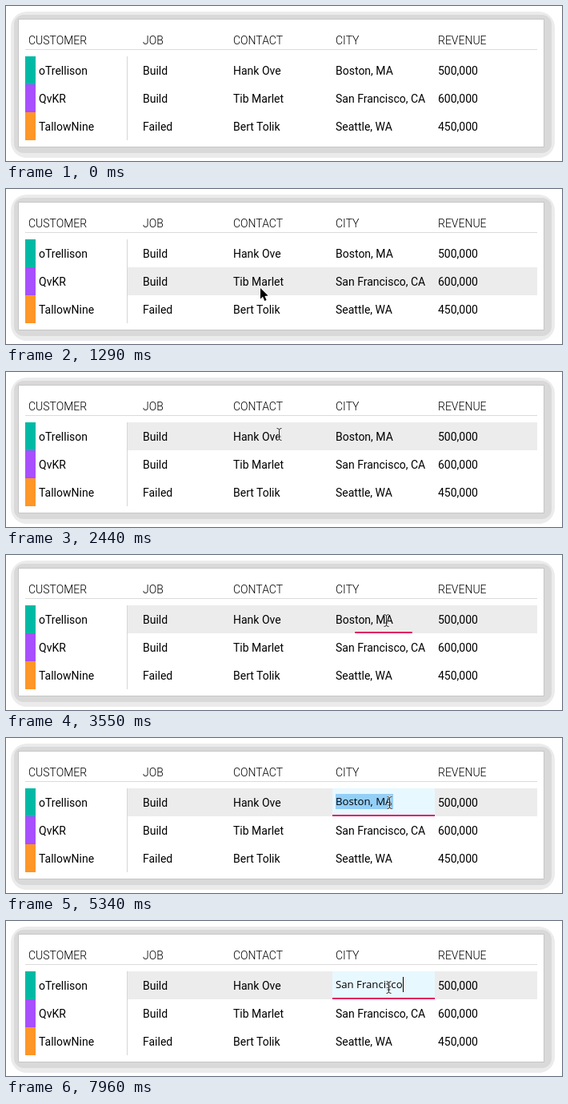
Recreate the animation shown at these times as an HTML page. Size 695 by 194 pixels, loop 8000 ms.

```html
<!DOCTYPE html>
<html lang="en">
<head>
<meta charset="utf-8">
<title>Inline table editing</title>
<style>
  html, body { margin: 0; width: 100%; height: 100%; overflow: hidden; background: #fff; }
  svg { display: block; width: 695px; height: 194px; }
  text { font: 14px Roboto, sans-serif; fill: #000; white-space: pre; }
  .head { font-weight: 300; }
  .input { font: 13.2px "Open Sans", "Noto Sans", sans-serif; }
</style>
</head>
<body>
<svg id="stage" viewBox="0 0 695 194"></svg>
<script>
const LOOP = 8000;
const stage = document.getElementById('stage');

function add(tag, attrs, parent = stage) {
  const el = document.createElementNS('http://www.w3.org/2000/svg', tag);
  for (const k in attrs) el.setAttribute(k, attrs[k]);
  return parent.appendChild(el);
}
const rect = (x, y, width, height, fill, parent, rx = 0) =>
  add('rect', { x, y, width, height, fill, rx }, parent);
function label(x, y, str, cls = '', parent = stage) {
  const el = add('text', { x, y, class: cls }, parent);
  el.textContent = str;
  return el;
}
const show = (el, on) => el.setAttribute('visibility', on ? 'visible' : 'hidden');

// Card with a banded shadow
rect(6, 7, 680, 183, '#ebebeb', stage, 20);
rect(10, 11, 672, 173, '#d9d9d9', stage, 12);
rect(15, 16, 658, 161, '#c6c6c6');
rect(16, 17, 656, 159, '#fff');
rect(24, 54, 640, 1, '#dadada');

const TOP = 63, ROW = 35;
const hover = rect(152, TOP, 512, ROW, '#ececec');
rect(151, TOP, 1, ROW * 3, '#d6d6d6');
['#00b9a5', '#a84fff', '#ff9628'].forEach((c, i) => rect(24, TOP + i * ROW, 13, ROW, c));

const columns = [171, 284, 412, 540];
['CUSTOMER', 'JOB', 'CONTACT', 'CITY', 'REVENUE'].forEach((s, i) =>
  label(i ? columns[i - 1] : 28, 48, s, 'head'));
const rows = [
  ['oTrellison', 'Build', 'Hank Ove', 'Boston, MA', '500,000'],
  ['QvKR', 'Build', 'Tib Marlet', 'San Francisco, CA', '600,000'],
  ['TallowNine', 'Failed', 'Bert Tolik', 'Seattle, WA', '450,000']
];
const cells = rows.map((row, r) => row.map((s, i) =>
  label(i ? columns[i - 1] : 41, 86 + r * ROW, s)));
const city = cells[0][3];

// Editor: opening state, then the focused field
const BLUE = '#94cff7';
const opening = add('g');
rect(482, 72, 48, 15, BLUE, opening);
rect(410, 87, 120, 8, BLUE, opening);
rect(533, TOP, 3, 32, BLUE, opening);
const field = add('g');
rect(408, TOP, 128, 33, '#e8f8ff', field);
const selection = rect(412, 70, 72, 19, BLUE);
const input = label(412, 84, '', 'input');
const caret = rect(412, 70, 1, 19, '#000');
const underline = rect(408, 96, 128, 2, '#e2125f');

// Pointers, both with the hot spot at 0,0
function pointer(d, attrs, halo) {
  const g = add('g');
  add('path', { d, fill: 'none', stroke: '#fff', 'stroke-width': halo, 'stroke-linejoin': 'round' }, g);
  add('path', { d, ...attrs }, g);
  return g;
}
const arrow = pointer('M0 0V13.5L3 10.8L5.3 16L7.6 15L5.4 10L9.6 9.6Z', { fill: '#000' }, 1.8);
const beam = pointer('M-3 -7.5Q0 -7.5 0 -5.5V5.5Q0 7.5 -3 7.5M3 -7.5Q0 -7.5 0 -5.5M0 5.5Q0 7.5 3 7.5M-2 3H2',
  { fill: 'none', stroke: '#222', 'stroke-width': 1 }, 2);

// time, x, y
const path = [
  [360, 312, 15], [1120, 315, 98], [1290, 318, 124], [1400, 320, 138],
  [1580, 320, 138], [1810, 325, 96], [2330, 327, 78], [2440, 341, 78],
  [2960, 474, 82], [3430, 474, 82], [3790, 478.5, 83], [4030, 478.5, 83],
  [4150, 485, 84], [4230, 485, 84], [4330, 478.5, 83], [4980, 478.5, 83],
  [5110, 475, 78], [5260, 481, 79], [5400, 478.5, 83]
];
function pointerAt(t) {
  const i = path.findIndex(p => p[0] > t);
  if (i === 0) return path[0].slice(1);
  if (i < 0) return path[path.length - 1].slice(1);
  const [t0, x0, y0] = path[i - 1], [t1, x1, y1] = path[i];
  const k = (t - t0) / (t1 - t0);
  return [x0 + (x1 - x0) * k, y0 + (y1 - y0) * k];
}
const overText = (x, y) =>
  [43, 81, 116, 151].some(c => Math.abs(y - c) < 7.5) &&
  (x >= 284 && x <= 344 || x >= 412 && x <= 484);

const OPEN = 4570, FOCUS = 4690, CLEAR = 6480, HOVER_LAG = 60;
const typed = 'San Francisco';
const keys = [6780, 6870, 6960, 7140, 7230, 7320, 7400, 7490, 7670, 7770, 7860, 7960, 7960];

function drawEditor(t) {
  const editing = t >= OPEN, focused = t >= FOCUS, cleared = t >= CLEAR;
  show(city, !editing);
  show(opening, editing && !focused);
  show(field, focused);
  show(selection, focused && !cleared);
  show(input, editing);
  show(caret, cleared);
  input.setAttribute('x', focused ? 412 : 410);
  const text = cleared ? typed.slice(0, keys.filter(k => k <= t).length) : 'Boston, MA';
  if (input.textContent !== text) input.textContent = text;
  if (cleared) caret.setAttribute('x', 412 + Math.round(text ? input.getComputedTextLength() : 0));

  const grow = Math.max(0, Math.min(1, (t - 3430) / 360));
  const w = 128 * (1 - (1 - grow) ** 2);
  underline.setAttribute('x', 472 - w / 2);
  underline.setAttribute('width', w);
}

function drawPointer(t) {
  const [x, y] = pointerAt(t);
  const isBeam = t >= OPEN || overText(x, y);
  const px = isBeam ? Math.floor(x) + 0.5 : Math.round(x);
  for (const el of [arrow, beam]) el.setAttribute('transform', `translate(${px} ${Math.round(y)})`);
  show(arrow, t >= 360 && !isBeam);
  show(beam, t >= 360 && isBeam);

  const row = Math.floor((pointerAt(t - HOVER_LAG)[1] - TOP) / ROW);
  show(hover, row >= 0);
  hover.setAttribute('y', TOP + Math.max(0, row) * ROW);
}

const start = performance.now();
function frame() {
  const t = (performance.now() - start) % LOOP;
  drawEditor(t);
  drawPointer(t);
  requestAnimationFrame(frame);
}
frame();
</script>
</body>
</html>
```
